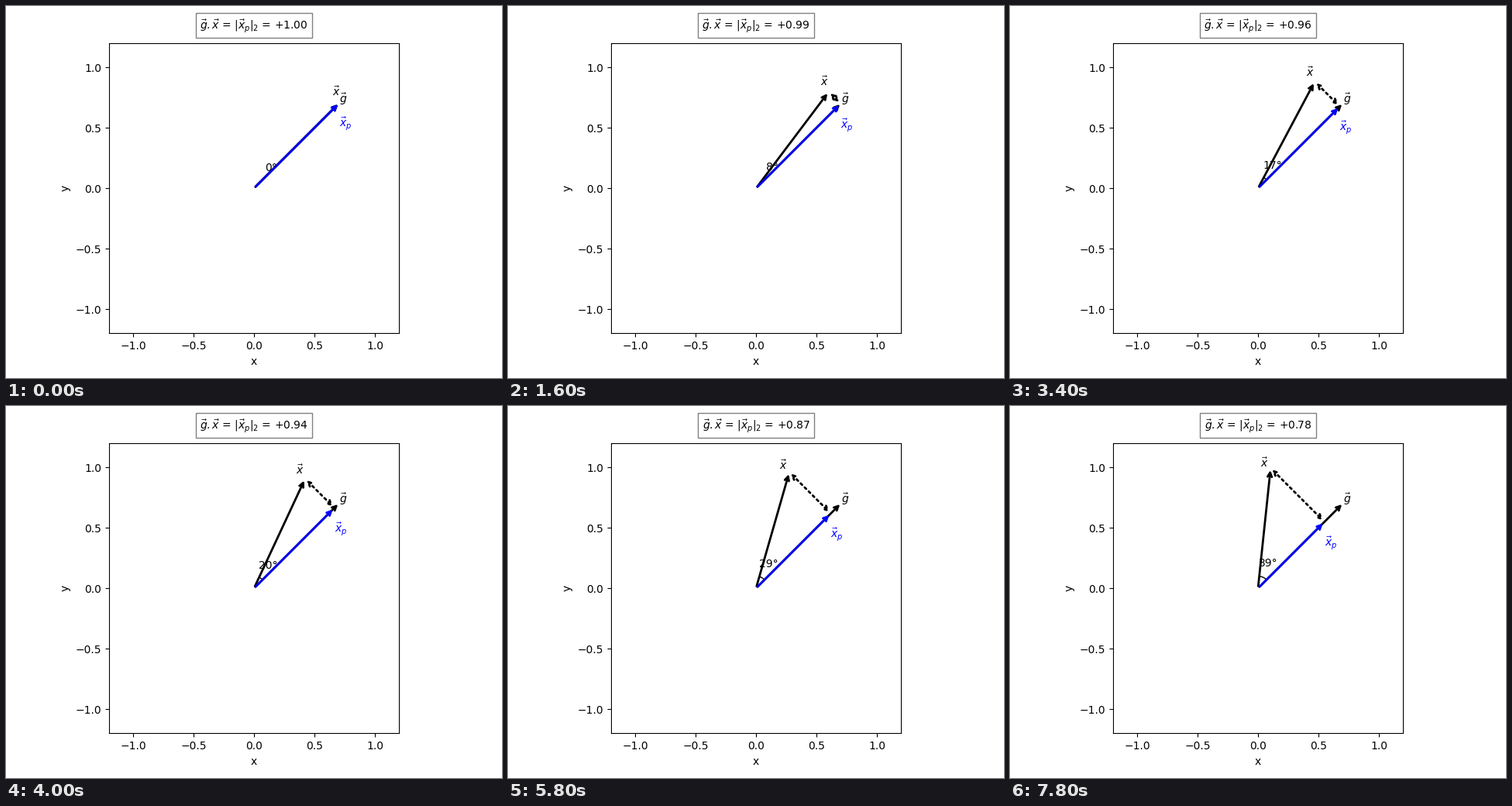
A matplotlib script for the animation above (8000 ms loop, 640 by 480 pixels).

```python
import numpy as np
import matplotlib.pyplot as plt
from matplotlib.animation import FuncAnimation
from matplotlib.patches import Arc, FancyArrowPatch

FRAMES, INTERVAL = 40, 200
BASE = 45  # direction of g in degrees


def unit(deg):
    a = np.radians(deg)
    return np.array([np.cos(a), np.sin(a)])


fig = plt.figure(figsize=(6.4, 4.8), dpi=100)
ax = fig.add_axes([0.2075, 0.12, 0.585, 0.78])
ax.set(xlim=(-1.2, 1.2), ylim=(-1.2, 1.2), xlabel="x", ylabel="y")
ax.set_xticks(np.arange(-1, 1.1, 0.5))
ax.set_yticks(np.arange(-1, 1.1, 0.5))

ORIGIN = np.zeros(2)
g = unit(BASE)


def arrow(color="black", style="->", line="-"):
    patch = FancyArrowPatch(ORIGIN, g, arrowstyle=style, mutation_scale=10,
                            lw=2, color=color, linestyle=line, zorder=3)
    return ax.add_patch(patch)


def label(text="", color="black", **kw):
    return ax.text(*g, text, color=color, **kw)


angle_label = label(ha="center")
arc = ax.add_patch(Arc(ORIGIN, 0.2, 0.2, theta1=BASE, theta2=BASE))
arrow()
x_arrow = arrow()
gap_arrow = arrow(style="<->", line=":")
p_arrow = arrow(color="blue")
label(r"$\vec{g}$")
x_label = label(r"$\vec{x}$")
p_label = label(r"$\vec{x}_p$", color="blue")
title = ax.text(0.5, 1.05, "", transform=ax.transAxes, ha="center",
                bbox=dict(facecolor="white", alpha=0.5))


def update(i):
    x = unit(BASE + i)
    dot = g @ x
    p = dot * g
    x_arrow.set_positions(ORIGIN, x)
    p_arrow.set_positions(ORIGIN, p)
    gap_arrow.set_positions(x, p)
    gap_arrow.set_visible(i > 0)
    arc.theta2 = BASE + i
    angle_label.set_position(0.2 * unit(BASE + i / 2))
    angle_label.set_text(f"{i}°")
    x_label.set_position(x + 0.085 * unit(BASE + i + 90))
    p_label.set_position(p - [0, 0.2])
    title.set_text(rf"$\vec{{g}}.\vec{{x}}$ = $|\vec{{x}}_p|_2$ = {dot:+.2f}")
    return []


anim = FuncAnimation(fig, update, frames=FRAMES, interval=INTERVAL,
                     repeat=True, repeat_delay=0)
plt.show()
```
